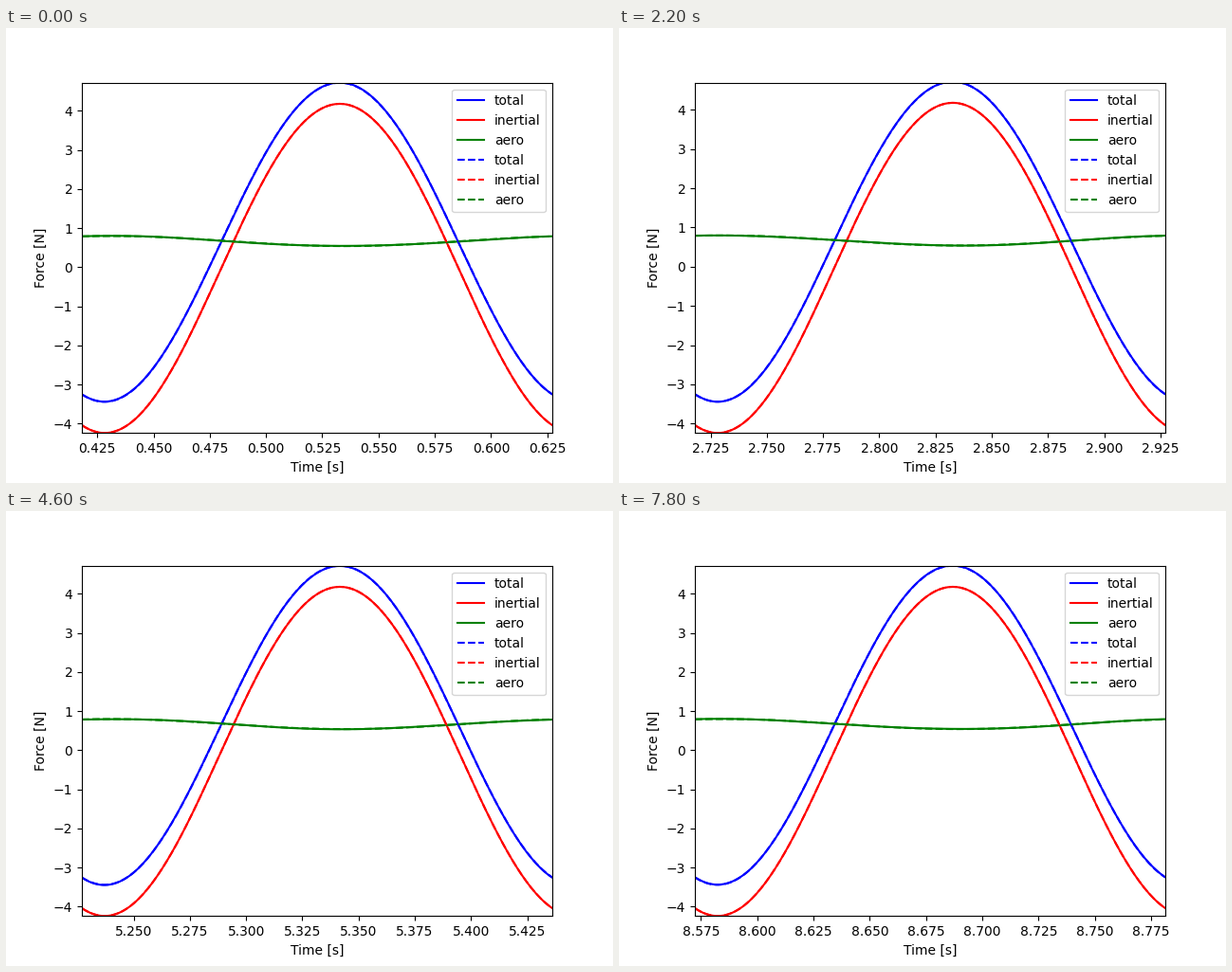
A matplotlib script that plays this animation: 640 px wide and 480 px high, repeating every 8 s.

```python
import numpy as np
import matplotlib.pyplot as plt
from matplotlib.animation import FuncAnimation

FRAMES = 40
INTERVAL = 200
PERIOD = 0.20908       # one wingbeat in seconds
FIRST_BEAT = 2
LOW, HIGH = -4.241, 4.722
TAU = 2 * np.pi


def forces(t, ripple=0.0):
    """Total, inertial and aerodynamic force at times t."""
    phase = TAU * t / PERIOD
    swing = phase - TAU * 0.0484
    inertial = -4.21 * np.cos(swing) - 0.031 * np.cos(2 * swing)
    aero = 0.668 + 0.129 * np.cos(phase - TAU * 0.06)
    aero = aero + ripple * np.sin(61 * t)
    return inertial + aero, inertial, aero


fig, ax = plt.subplots(figsize=(6.4, 4.8), dpi=100)
names = ("total", "inertial", "aero")
colors = ("blue", "red", "green")
solid = [ax.plot([], [], color=c, label=n)[0] for n, c in zip(names, colors)]
dashed = [ax.plot([], [], "--", color=c, label=n)[0]
          for n, c in zip(names, colors)]
ax.set_xlabel("Time [s]")
ax.set_ylabel("Force [N]")
ax.legend(loc="upper right")


def update(i):
    start = (FIRST_BEAT + i) * PERIOD
    t = np.linspace(start, start + PERIOD, 200)
    for line, y in zip(solid, forces(t, 0.006)):
        line.set_data(t, y)
    for line, y in zip(dashed, forces(t)):
        line.set_data(t, y)
    # the upper limit dips a little on some beats
    dip = 0.03 * max(0.0, np.cos(TAU * 4.3 / 14 * (i - 21)))
    ax.set_xlim(start, start + PERIOD)
    ax.set_ylim(LOW, HIGH - dip)
    return solid + dashed


anim = FuncAnimation(fig, update, frames=FRAMES, interval=INTERVAL,
                     init_func=lambda: update(0), repeat=True,
                     repeat_delay=0, blit=False)
plt.show()
```
